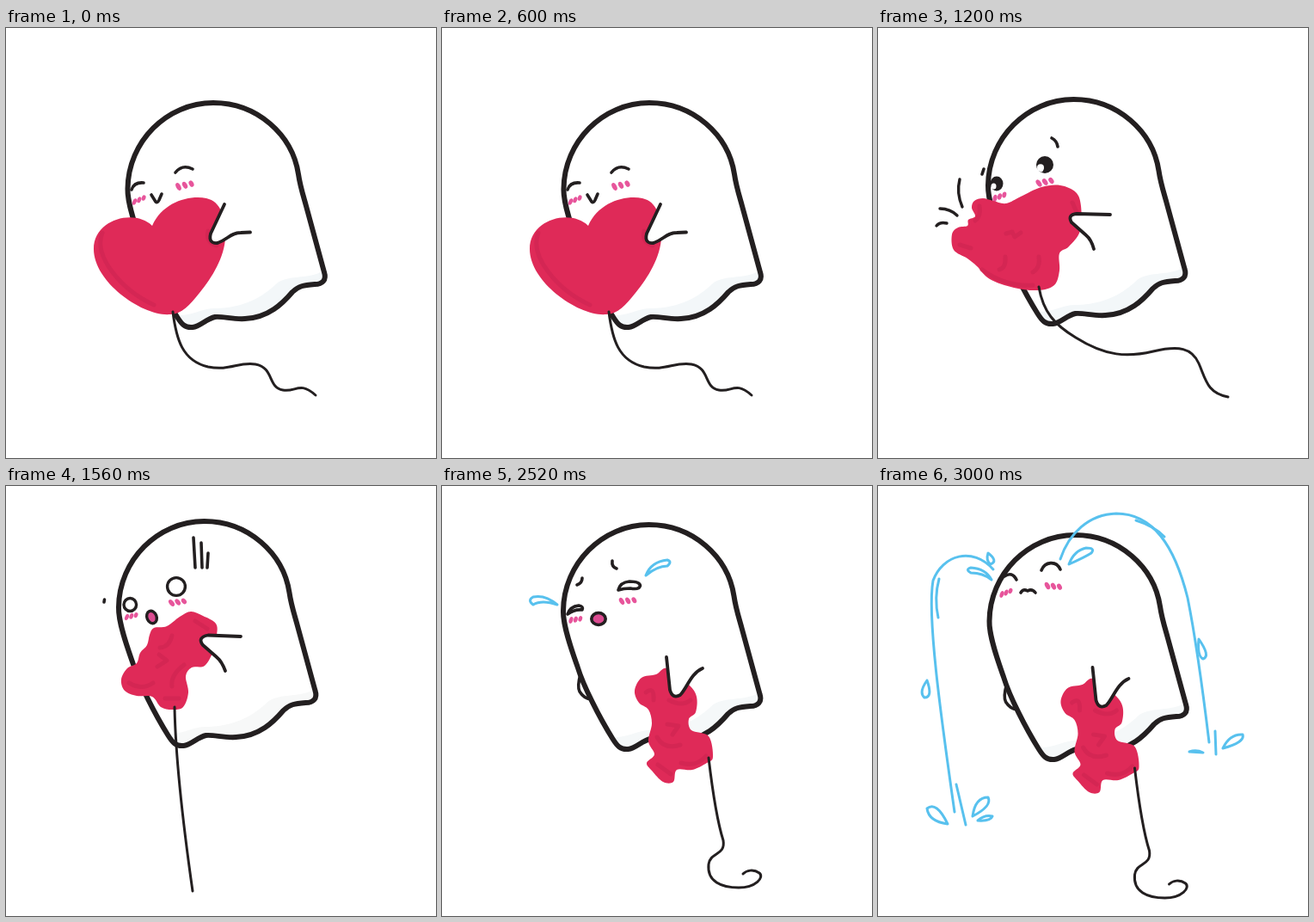
Recreate the animation shown at these times as an HTML page. Size 500 by 500 pixels, loop 3240 ms.

```html
<!DOCTYPE html>
<html lang="en">
<head>
<meta charset="utf-8">
<title>Ghost and heart balloon</title>
<style>
html, body { margin: 0; width: 100%; height: 100%; overflow: hidden; background: #fff; }
svg { display: block; width: 100vw; height: 100vh; }
</style>
</head>
<body>
<svg viewBox="0 0 500 500" fill="none" stroke-linecap="round" stroke-linejoin="round"><g id="stage"></g></svg>
<script>
const INK = '#231f20', RED = '#df2a58', SHADE = '#cd2350', PINK = '#e7559b', BLUE = '#58c1ee';
const stage = document.getElementById('stage');

const move = (x, y, s) => `<g transform="translate(${x} ${y})">${s}</g>`;
const path = (d, stroke, w, fill = 'none') =>
  `<path d="${d}" stroke="${stroke}" stroke-width="${w}" fill="${fill}"/>`;
const ink = (d, w = 3.6, fill) => path(d, INK, w, fill);
const tear = (...ds) => ds.map(d => path(d, BLUE, 3)).join('');
const oval = (x, y, rx, ry, fill, w = 0, turn = 0) =>
  `<ellipse cx="${x}" cy="${y}" rx="${rx}" ry="${ry}" fill="${fill}" stroke="${w ? INK : 'none'}" stroke-width="${w}" transform="rotate(${turn} ${x} ${y})"/>`;

// Closed smooth curve through x,y pairs
function smooth(p) {
  const n = p.length / 2;
  const at = i => { const k = (i + n) % n * 2; return [p[k], p[k + 1]]; };
  let d = `M${at(0)}`;
  for (let i = 0; i < n; i++) {
    const [a, b, c, e] = [at(i - 1), at(i), at(i + 1), at(i + 2)];
    const c1 = [0, 1].map(k => b[k] + (c[k] - a[k]) / 6);
    const c2 = [0, 1].map(k => c[k] - (e[k] - b[k]) / 6);
    d += `C${c1} ${c2} ${c}`;
  }
  return d + 'Z';
}
const blob = (pts, folds) =>
  `<path d="${smooth(pts)}" fill="${RED}"/><g opacity=".6">${path(folds, SHADE, 5)}</g>`;

// Three slanted marks, sized s, stepping by dx, dy
const cheek = (x, y, dx, dy, s, turn) =>
  [0, 1, 2].map(i => oval(x + dx * i, y + dy * i, 2.7 * s, (4.7 - i * .4) * s, PINK, 0, turn)).join('');

const BODY = 'M141.5 187C142 132 187 87 241 87C292 87 333 124 340 170C342 184 346 196 349 207L370 284' +
  'C373 293 368 298 359 298C346 299 340 300 333 307C322 320 305 337 278 338C264 339 252 335 243 336' +
  'C233 338 226 347 217 348C208 349 204 344 199 336C184 312 165 275 158 252C152 235 141 205 141.5 187Z';
const HEM = 'M201 334C220 334 228 325 246 326C285 324 303 308 316 296C330 287 352 292 368 283L370 290' +
  'C370 296 365 298 359 298C346 299 340 300 333 307C322 320 305 337 278 338C264 339 252 335 243 336' +
  'C233 338 226 347 217 348C208 349 204 342 201 334Z';
const body = (x, y, hem) => move(x, y,
  `<path d="${BODY}" fill="#fff"/><path d="${HEM}" fill="${hem}"/>` + ink(BODY, 6));

function hug() {
  const heart = 'M191 333C160 336 102 296 102 257C102 222 150 210 170 230C182 203 212 194 233 198' +
    'C250 202 255 219 255 244C254 266 240 290 225 308C214 322 204 333 191 333Z';
  return body(0, 0, '#f3f7f9') +
    ink('M146 188Q149 179 160 180M197 168Q205 158 217 164M169 194L174 202Q176 204 178 200L181 193') +
    cheek(200.5, 184.5, 7.5, -1.7, 1, -28) + cheek(149.5, 202, 5.3, -2.2, .85, 22) +
    `<path d="${heart}" fill="${RED}"/><g opacity=".55">` +
    path('M112 238C101 266 135 305 172 322M235 236Q232 249 245 253', SHADE, 5) + '</g>' +
    ink('M254 205L238 239Q235 251 246 250C258 246 261 238 273 238L284 237.5', 3.8, '#fff');
}

const POP_HEART = [112, 201, 122, 198, 134, 201, 149, 204, 166, 196, 190, 185, 212, 183, 230, 191, 236, 207,
  235, 236, 222, 254, 211, 262, 211, 282, 205, 299, 186, 305, 158, 302, 130, 292, 115, 277, 104, 268,
  88, 258, 86, 240, 93, 232, 104, 230, 105, 223, 113, 219, 109, 209];
function pop() {
  return body(-13.5, -4, '#f3f7f9') +
    oval(138, 181, 7.5, 8.5, INK) + oval(134.5, 184, 3, 3.6, '#fff') +
    oval(194, 159, 10, 10, INK) + oval(189, 162.5, 4, 4.2, '#fff') + oval(190, 166, 1.6, 1.6, '#fff') +
    ink('M202 128Q208 131 209 138M121 170L123 164') +
    cheek(187, 180.5, 7.2, -1.5, 1, -35) + cheek(136, 198, 5.4, -2, .9, 15) +
    blob(POP_HEART, 'M121 281Q148 301 180 299M149 239L156 237L159 243L166 238M187 266Q189 279 180 284' +
      'M148 266Q149 279 141 281M118 207Q120 219 113 224M226 203L231 214M95 252L108 256') +
    ink('M270 217L231 216Q220 217 225 226L242 241Q248 246 251 257', 3.8, '#fff') +
    ink('M72 210Q84 210 92 218M68 230Q72 225 80 227M98 208Q91 192 95 176', 3.4);
}

const GASP_HEART = [172, 165, 187, 163, 202, 152, 215, 146, 229, 151, 244, 160, 245, 174, 241, 192, 231, 209,
  216, 211, 209, 221, 212, 240, 206, 257, 193, 260, 180, 257, 170, 245, 152, 244, 138, 238, 134, 225,
  141, 212, 152, 206, 156, 194, 164, 185, 167, 173];
function gasp(worry = true) {
  return body(-10.5, -46, '#f7f8f8') +
    oval(144.3, 138, 7.3, 7.5, '#fff', 3.4) + oval(198, 117, 10.4, 10.4, '#fff', 3.4) +
    (worry ? ink('M218 60L220 95M227 66L228 95M235 78L234 95M114 135L114.5 132') : '') +
    cheek(192.5, 136, 7.2, -1, .95, -40) + cheek(140.5, 152.5, 5.3, -1.2, .82, 22) +
    oval(169.5, 152.5, 5.6, 7.4, '#dc4b91', 3.4, -22) +
    blob(GASP_HEART, 'M178 196L187 203L176 210M193 174Q190 187 179 188M207 208Q191 220 193 233' +
      'M143 229Q158 238 171 229M185 247L201 247M220 157L234 166') +
    ink('M273 175L235 173.5Q222 176 229 185L245 199Q251 204 255 215', 3.8, '#fff');
}

const CRY_HEART = [262, 212, 249, 219, 232, 223, 224, 238, 229, 252, 240, 260, 244, 276, 240, 297, 247, 312,
  238, 322, 244, 331, 257, 344, 269, 344, 273, 330, 291, 330, 308, 322, 315, 315, 310, 291, 290, 284,
  287, 271, 295, 263, 296, 245, 287, 231];
const cryFace = brows =>
  ink('M205 121Q207 112 218 111Q230 111 230.5 116Q229 121 219 119Q211 119 205 121Z', 3.6, '#fff') +
  ink('M146 149Q149 140 159 139Q165 140 163 144Q154 143 146 149Z', 3.6, '#fff') +
  (brows ? ink('M198 87Q197 94 203 96M163 107Q163 113 157 115') : '') +
  cheek(209, 134, 7.2, -.6, .95, -30) + cheek(150, 156, 5.4, -.8, .85, 18) +
  oval(182, 154.5, 8.2, 7, '#dc4b91', 3.6);
const sobFace = () => move(11.5, -12,
  ink('M190 98C194 88 207 86 212 97M147 105Q156 99 161 109M166 124Q169 119 174 122Q179 119 183 124') +
  cheek(197, 116, 7, .6, .98, -28) + cheek(144, 126, 5, -2, .85, 20));
function cry(face, tears = '') {
  return ink('M161 219Q157 233 160 239Q165 247 173 248', 3.6, '#fff') +
    body(-.5, -42, '#f5f8f9') + face +
    blob(CRY_HEART, 'M237 240Q247 232 246 249M262 277L275 279L268 289M250 292Q258 307 277 301' +
      'M251 324L266 335M278 322Q296 327 307 314M264 249Q279 257 289 249') +
    ink('M261 199L265 237Q268 248 277 243C285 235 289 218 303 212', 3.8, '#fff') + tears;
}

const drips = tear('M237 104Q243 88 262 86Q268 88 262 93Q250 93 237 104Z',
  'M134 138Q120 126 106 129Q99 133 106 138Q116 132 134 138Z');
const spurt = drips + tear('M230 104C245 68 290 48 330 62C360 75 380 105 391 150', 'M304 65Q325 68 342 82',
  'M136 126C120 108 95 112 90 140C88 160 90 175 92 190');
const gush = drips + tear('M225 98C242 62 290 38 325 58C365 80 385 150 405 250', 'M308 58Q330 65 346 83',
  'M143 110C118 90 85 95 78 125C74 170 82 230 90 290', 'M85 124Q81 143 84 162');
const flood = move(11.5, -12, tear(
  'M212 85C222 55 245 33 277 32C320 32 345 70 360 130C370 180 378 240 385 298', 'M300 40Q320 46 333 59',
  'M392 285L393 312', 'M134 97C110 70 75 80 64 110C57 150 72 260 89 379', 'M71 108Q65 130 70 153',
  'M91 347L102 394', 'M222 91Q228 75 242 72Q253 72 248 78Q240 83 222 91Z',
  'M132 109Q125 96 108 95Q101 97 108 101Q122 101 132 109Z', 'M128 78Q125 87 131 91Q140 87 128 78Z',
  'M57 226Q47 240 54 246Q64 246 57 226Z', 'M373 178Q371 198 378 201Q387 198 373 178Z',
  'M401 305Q409 288 424 289Q427 298 401 305Z', 'M362 309Q370 306 378 310Z',
  'M81 393Q59 390 57 375Q68 366 81 393Z', 'M110 384Q113 362 128 362Q133 372 110 384Z',
  'M116 389Q124 382 133 384Q131 390 116 389Z'));

const CURL = 'C330 430 312 425 310 440C308 460 325 467 345 467C365 467 375 455 369 450C362 445 354 447 350 451';
const cryString = 'M310 316C314 350 320 390 327 412' + CURL;
const gaspString = 'M196 257C197 310 204 380 217 471';
const sway = [
  [hug, 0, 0, 'M194 330C198 362 205 387 235 394C260 399 270 388 290 391C312 395 304 418 322 421C337 424 341 410 360 427'],
  [hug, 0, -23, 'M194 330C198 362 208 385 238 398C270 411 300 400 309 430C315 452 330 453 345 472'],
  [hug, 0, -27, 'M194 330C196 370 200 400 222 415C245 430 240 455 262 462C280 466 285 470 300 480'],
  [hug, -29, -7, 'M194 330C205 365 235 385 270 388C310 390 325 385 345 392C370 402 375 430 432 440']
];

// start time, scene, shift x, shift y, string
const timeline = [
  ...[0, 120, 280, 440, 600, 720, 880, 1040].map((t, i) => [t, ...sway[i % 4]]),
  [1200, pop, 0, 0, 'M187 301C192 330 205 345 230 360C265 382 290 383 320 376C350 369 365 372 373 390C381 408 382 424 407 429'],
  [1400, pop, 25, -38, 'M187 301C190 350 215 380 225 420C232 455 235 480 250 506'],
  [1560, gasp, 0, 0, gaspString],
  [1800, gasp, 0, -8, 'M196 257C199 320 205 400 200 489'],
  [1960, gasp, 0, 0, gaspString],
  [2200, () => gasp(false), 0, 4, 'M196 257C205 320 300 370 317 408' + 'C320 426 302 421 300 436C298 456 315 463 335 463C355 463 365 451 359 446C352 441 344 443 340 447'],
  [2360, () => cry(cryFace(false)), -10, 0, cryString],
  [2520, () => cry(cryFace(true), drips), 0, 0, cryString],
  [2680, () => cry(cryFace(true), spurt), -2, 0, cryString],
  [2840, () => cry(sobFace(), gush), -3, 0, cryString],
  [3000, () => cry(sobFace(), flood), -11.5, 12, cryString]
];
const LOOP = 3240;
let shown = -1;

function render(ms) {
  const i = timeline.findLastIndex(step => step[0] <= ms);
  if (i === shown) return;
  shown = i;
  const [, scene, x, y, string] = timeline[i];
  stage.innerHTML = move(x, y, scene() + ink(string, 3));
}

const start = performance.now();
function tick() {
  render((performance.now() - start) % LOOP);
  requestAnimationFrame(tick);
}
tick();
</script>
</body>
</html>
```
